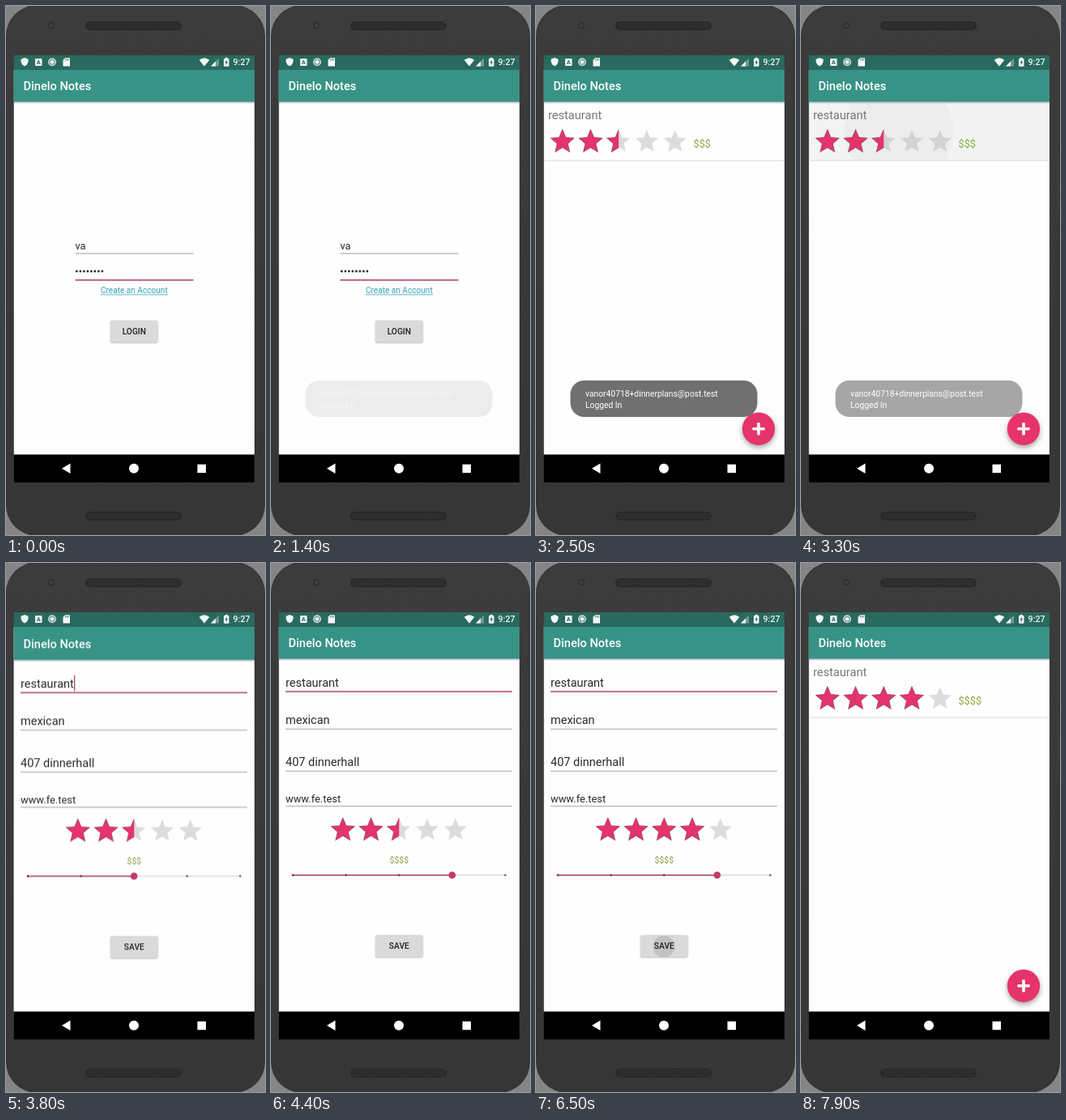
Recreate the animation shown at these times as an HTML page with a canvas. Size 320x654 px, loop 8000 ms.

```html
<!DOCTYPE html>
<html lang="en">
<head>
<meta charset="utf-8">
<title>Phone demo</title>
<style>
html, body { margin: 0; width: 100%; height: 100%; overflow: hidden; background: #858585; }
canvas { display: block; width: 320px; height: 654px; }
</style>
</head>
<body>
<canvas id="stage"></canvas>
<script>
const W = 320, H = 654, LOOP = 8000;
const SCREEN = { x: 9.5, y: 61, w: 297.5, h: 528 };
const PINK = '#e6346b', LINE = '#b04470', INK = '#2a2a2a';
const dpr = window.devicePixelRatio || 1;

function setup(canvas) {
  canvas.width = W * dpr;
  canvas.height = H * dpr;
  const c = canvas.getContext('2d');
  c.scale(dpr, dpr);
  return c;
}
const stage = setup(document.getElementById('stage'));
const layerCanvas = document.createElement('canvas');
const layer = setup(layerCanvas);
let g = stage;

const clamp = v => Math.max(0, Math.min(1, v));
const span = (t, a, b) => clamp((t - a) / (b - a));
const easeOut = p => 1 - (1 - p) ** 3;

function rect(x, y, w, h, color) {
  g.fillStyle = color;
  g.fillRect(x, y, w, h);
}
function round(x, y, w, h, r, color) {
  g.fillStyle = color;
  g.beginPath();
  g.roundRect(x, y, w, h, r);
  g.fill();
}
function disc(x, y, r, color) {
  g.fillStyle = color;
  g.beginPath();
  g.arc(x, y, r, 0, Math.PI * 2);
  g.fill();
}
function poly(color, ...p) {
  g.fillStyle = color;
  g.beginPath();
  for (let i = 0; i < p.length; i += 2) g.lineTo(p[i], p[i + 1]);
  g.closePath();
  g.fill();
}
function text(str, x, y, size, color, weight = 400, align = 'left') {
  g.font = `${weight} ${size}px Roboto, sans-serif`;
  g.textAlign = align;
  g.fillStyle = color;
  g.fillText(str, x, y);
}
function shadowed(blur, dy, alpha, draw) {
  g.save();
  g.shadowColor = `rgba(0,0,0,${alpha})`;
  g.shadowBlur = blur * dpr;
  g.shadowOffsetY = dy * dpr;
  draw();
  g.restore();
}

function grille(y) {
  round(98, y, 119, 11, 5.5, '#292929');
  for (let row = 0; row < 3; row++)
    for (let x = 102 + row % 2 * 1.5; x < 214; x += 3)
      rect(x, y + 2.3 + row * 2.6, 1.3, 1.3, '#404040');
}

function phone() {
  rect(0, 0, W, H, '#858585');
  round(0, -1, W, H + 2, 38, '#303030');
  const body = g.createLinearGradient(0, 0, 0, H);
  body.addColorStop(0, '#3c3c3c');
  body.addColorStop(1, '#363636');
  round(1, 0, W - 2, H, 37, body);
  disc(56, 24, 4.5, '#313131');
  disc(56, 24, 2, '#424242');
  grille(19);
  grille(625);
}

function statusBar() {
  rect(9.5, 61, 297.5, 18, '#29695e');
  const w = '#f4f8f7';
  poly(w, 23, 64, 27.5, 65.8, 27.5, 69, 26, 72.3, 23, 74.5, 20, 72.3, 18.5, 69, 18.5, 65.8);
  round(36, 65, 8.5, 9, 1, w);
  text('A', 40.2, 72.3, 7.5, '#29695e', 700, 'center');
  disc(57, 69.3, 5, '#c9dbd7');
  disc(57, 69.3, 3.5, '#6f9b92');
  disc(57, 69.3, 2.3, w);
  poly(w, 73, 64.2, 79, 64.2, 79, 74.5, 70.5, 74.5, 70.5, 66.7);
  for (let x = 73.2; x < 78; x += 1.8) rect(x, 65.4, 0.9, 2, '#29695e');
  g.fillStyle = w;
  g.beginPath();
  g.moveTo(245, 74.5);
  g.lineTo(238.7, 66.8);
  g.quadraticCurveTo(245, 61.8, 251.3, 66.8);
  g.fill();
  poly('#6e9a92', 253, 74.5, 263, 64.5, 263, 74.5);
  poly(w, 253, 74.5, 259, 68.5, 259, 74.5);
  round(269, 65, 6.5, 9.7, 1, w);
  rect(270.8, 63.8, 3, 2, w);
  poly('#29695e', 273, 66.3, 270.5, 70.3, 272, 70.3, 271.5, 73.3, 274.2, 69.2, 272.7, 69.2);
  text('9:27', 280.6, 73.2, 10.6, w, 500);
}

function navBar() {
  rect(9.5, 554.5, 297.5, 34.5, '#000');
  poly('#fff', 69, 571.7, 79.5, 565.5, 79.5, 578);
  disc(158, 571.7, 6, '#fff');
  rect(236.5, 566.7, 10.5, 10.5, '#fff');
}

function page() {
  rect(9.5, 79, 297.5, 476, '#fefefe');
}
function toolbar() {
  const fade = g.createLinearGradient(0, 118, 0, 121.5);
  fade.addColorStop(0, 'rgba(0,0,0,.26)');
  fade.addColorStop(1, 'rgba(0,0,0,0)');
  rect(9.5, 118, 297.5, 4, fade);
  rect(9.5, 79, 297.5, 39.5, '#379386');
  text('Dinelo Notes', 21.5, 104, 14.6, '#fff', 500);
}

function button(label, y, press) {
  shadowed(2, 0.7, 0.3, () => round(129, y, 58.5, 27, 2, '#d9dbda'));
  if (press > 0 && press < 1) {
    g.save();
    g.beginPath();
    g.roundRect(129, y, 58.5, 27, 2);
    g.clip();
    disc(158, y + 14, 36 * easeOut(press), `rgba(0,0,0,${0.13 * (1 - press)})`);
    g.restore();
  }
  text(label, 158.3, y + 17.3, 10.2, '#222', 500, 'center');
}

function starPath(x, y) {
  g.beginPath();
  for (let i = 0; i < 10; i++) {
    const r = i % 2 ? 6.7 : 14.7, a = i * Math.PI / 5;
    g.lineTo(x + r * Math.sin(a), y - r * Math.cos(a));
  }
  g.closePath();
}
function stars(x0, y, rating, empty = '#dcdcdc') {
  for (let i = 0; i < 5; i++) {
    const x = x0 + i * 34.75, part = clamp(rating - i);
    starPath(x, y);
    g.fillStyle = empty;
    g.fill();
    if (!part) continue;
    g.save();
    g.beginPath();
    g.rect(x - 15, y - 16, 30 * part, 32);
    g.clip();
    starPath(x, y);
    g.fillStyle = PINK;
    g.fill();
    g.lineWidth = 1.2;
    g.strokeStyle = '#b5446e';
    g.stroke();
    g.restore();
  }
}

function login(t) {
  page();
  text('va', 85.5, 300.7, 12.8, INK);
  rect(85.5, 305.5, 146, 1, '#a0a0a0');
  for (let i = 0; i < 8; i++) disc(87.4 + i * 4.5, 328, 1.4, INK);
  rect(85.5, 338, 146, 1.6, LINE);
  text('Create an Account', 158.3, 355.4, 10.1, '#32a3b9', 400, 'center');
  rect(117, 356.5, 83, 0.8, '#32a3b9');
  button('LOGIN', 388.7, span(t, 1000, 1350));
  toolbar();
}

function list(t) {
  const done = t > 6000;
  page();
  const touch = done ? 0 : span(t, 3100, 3200);
  if (touch) {
    g.save();
    g.beginPath();
    g.rect(9.5, 119, 297.5, 72);
    g.clip();
    rect(9.5, 119, 297.5, 72, `rgba(0,0,0,${0.042 * touch})`);
    disc(121, 155, 67 * (t - 3100) / 200, 'rgba(0,0,0,.022)');
    g.restore();
  }
  text('restaurant', 15, 139.7, 14.6, '#777');
  stars(32.7, 168, done ? 4 : 2.5, touch ? '#d3d3d3' : '#dcdcdc');
  text(done ? '$$$$' : '$$$', 194.5, 175.3, 12.7, '#8aa83c');
  rect(9.5, 190.5, 297.5, 1, '#d9d9d9');
  shadowed(6, 3, 0.35, () => disc(275, 522.7, 20.2, PINK));
  round(267.3, 520.9, 15.4, 3.6, 1.2, '#fff');
  round(273.2, 515, 3.6, 15.4, 1.2, '#fff');
  toolbar();
}

function field(str, base, size, lineY, active) {
  text(str, 18, base, size, INK);
  rect(18, lineY, 280, active ? 1.5 : 1, active ? LINE : '#a3a3a3');
}

function edit(t) {
  page();
  field('restaurant', 152.6, 14.5, 158.2, true);
  field('mexican', 199.1, 14.5, 204.8);
  field('407 dinnerhall', 250.8, 14.5, 256.7);
  field('www.fe.test', 295.5, 12.9, 300.2);
  if (Math.floor((t - 3700) / 500) % 2 === 0) rect(84, 137.5, 1.3, 19.5, LINE);

  const rating = t < 4800 ? 2.5 : t < 4900 ? 3 : t < 5000 ? 3.5 : 4;
  stars(88.8, 330.3, rating);

  const price = t < 4100 ? 2 : 3, tick = i => 27 + i * 65.6;
  text('$'.repeat(price + 1), 158.3, 370.8, 10.4, '#949c42', 400, 'center');
  rect(27, 385.4, 262.5, 1, '#c9c9c9');
  rect(27, 385.2, tick(price) - 27, 1.5, LINE);
  for (let i = 0; i < 5; i++) disc(tick(i), 385.9, 1.3, i > price ? '#666' : '#7d2747');
  disc(tick(price), 385.9, 4.4, '#c43a66');
  button('SAVE', 460, span(t, 6450, 6800));
  toolbar();
}

function toast(t) {
  const a = Math.min(span(t, 1360, 1690), 1 - span(t, 3186, 3486));
  if (a <= 0) return;
  g.globalAlpha = a;
  round(42.5, 463, 231, 45, 17, '#707070');
  g.globalAlpha = Math.min(1, a * 4);
  text('vanor40718+dinnerplans@post.test', 61, 483.4, 10.3, '#fff');
  text('Logged In', 61, 497, 10.3, '#fff');
  g.globalAlpha = 1;
}

// Paints a screen off to the side, then blends it in as one piece.
function overlay(draw, t, shown) {
  g = layer;
  g.clearRect(0, 0, W, H);
  draw(t);
  g = stage;
  g.globalAlpha = clamp(shown * 1.5);
  g.drawImage(layerCanvas, 0, 36 * (1 - shown), W, H);
  g.globalAlpha = 1;
}

function screens(t) {
  if (t < 1600) return login(t);
  if (t < 1900) {
    login(t);
    return overlay(list, t, easeOut(span(t, 1600, 1900)));
  }
  if (t < 3600) return list(t);
  if (t < 3900) {
    list(t);
    return overlay(edit, t, easeOut(span(t, 3600, 3900)));
  }
  if (t < 6700) return edit(t);
  list(t);
  if (t < 6950) overlay(edit, t, 1 - span(t, 6700, 6950) ** 2);
}

function frame(now) {
  const t = now % LOOP;
  g = stage;
  phone();
  g.save();
  g.beginPath();
  g.rect(SCREEN.x, SCREEN.y, SCREEN.w, SCREEN.h);
  g.clip();
  screens(t);
  toast(t);
  statusBar();
  navBar();
  g.restore();
}

const start = performance.now();
function tick(now) {
  frame(Math.max(0, now - start));
  requestAnimationFrame(tick);
}
tick(start);
</script>
</body>
</html>
```
